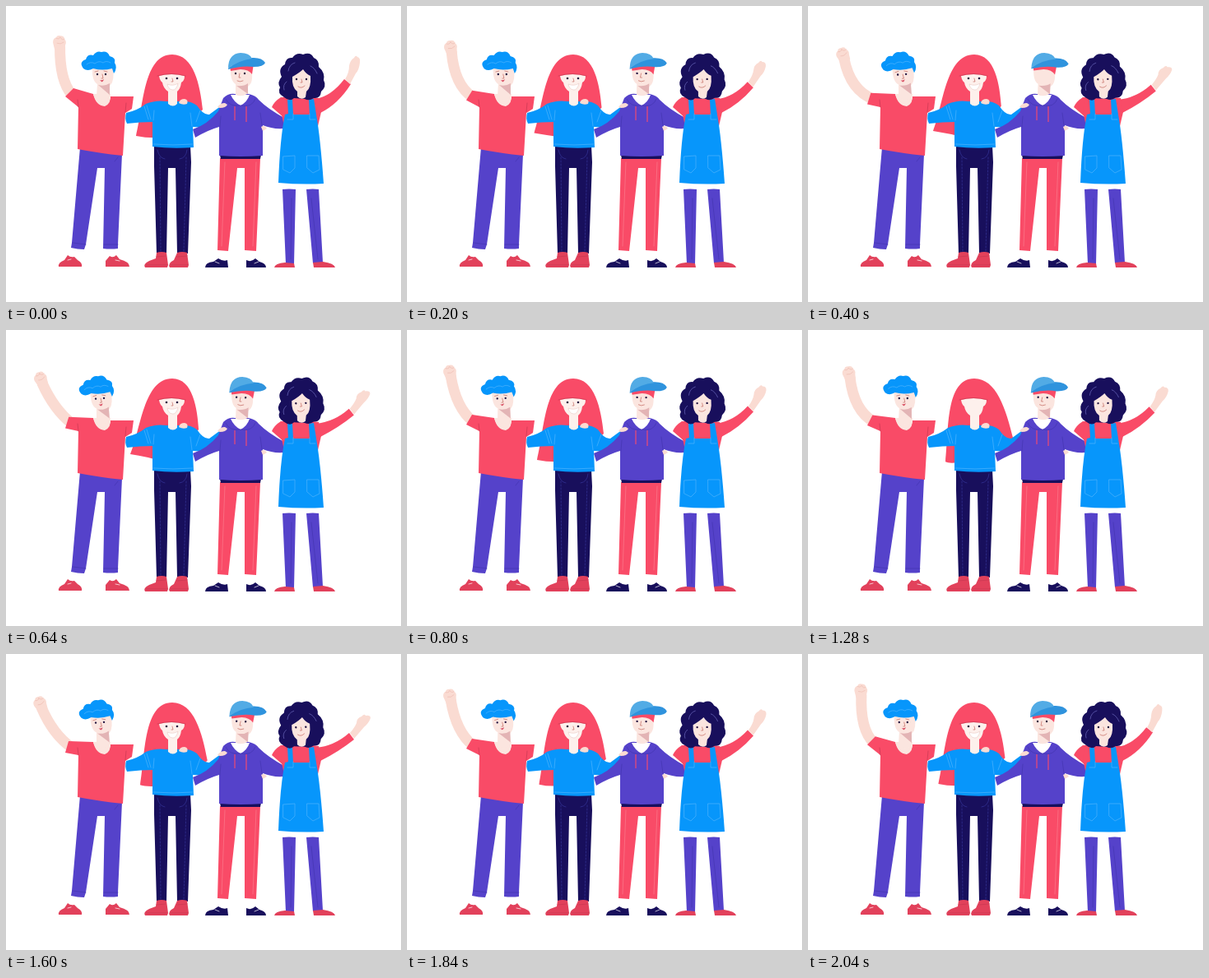
An HTML page that plays this animation: 480 px wide and 360 px high, repeating every 2080 ms.

```html
<!DOCTYPE html>
<html lang="en">
<head>
<meta charset="utf-8">
<title>Four friends waving</title>
<style>
html, body { margin: 0; width: 100%; height: 100%; overflow: hidden; background: #fff; }
svg { display: block; width: 480px; height: 360px; }
.red { fill: #f94b67; }
.shoe { fill: #e2415b; }
.blue { fill: #0796fb; }
.purple { fill: #5542ca; }
.navy { fill: #180f5c; }
.skin { fill: #fbe5df; }
.arm { fill: #fadbd2; }
.pale { fill: #fdf0ec; }
.shade { fill: #e3b4b5; }
.line { fill: none; stroke-width: .7; stroke-linecap: round; stroke-linejoin: round; }
.light { stroke: #4fb3fd; }
.dark { stroke: #4436b0; }
.rose { stroke: #c93852; }
.white { stroke: #fff; }
.stitch { stroke: #35369a; stroke-dasharray: 2 2; }
.face { stroke: #c2685f; }
.eye { fill: #20123f; }
</style>
</head>
<body>
<svg viewBox="0 0 480 360">
  <!-- man in red shirt -->
  <g>
    <path id="armL" fill="none" stroke="#fadbd2" stroke-width="13"/>
    <g id="fistL">
      <path class="arm" d="M-6 10 L-8 1 Q-8 -4 -4 -5 Q-3 -8 1 -7 Q6 -7 6 -3 Q9 0 7 4 L6 10Z"/>
      <path class="line" stroke="#eebfb5" d="M-4 -4 Q-1 -2 1 -5 M1 -5 Q3 -1 6 -3 M-3 2 Q1 4 5 1"/>
    </g>
    <path class="purple" d="M90 172 L141 180 L136 290 L136 295 Q127 296 118 295 L120 197 L111 197 L97 290 L95 296 Q87 296 79 294 L80 288Z"/>
    <path class="line dark" d="M81 288 L97 290 M119 290 L136 290 M136 184 L132 189"/>
    <path id="shirt" class="red"/>
    <path class="line rose" d="M88 123 L87 114 M145 129 L146 118"/>
    <path class="skin" d="M106 107 L127 107 Q128 119 120 122 Q109 121 106 107Z"/>
    <path class="shoe" d="M64 317 Q63 312 71 309 L75 303 Q78 306 83 305 L87 309 Q93 312 92 317Z"/>
    <path class="shoe" d="M121 317 L121 310 L126 304 Q130 307 134 303 L138 308 Q150 311 150 317Z"/>
    <path class="line white" d="M75 309 L79 308 M133 309 L138 310"/>
    <g id="headL">
      <path class="skin" d="M105 74 L130 74 Q132 91 127 96 L126 97 L126 111 Q118 118 110 110 L111 95 Q104 91 105 74Z"/>
      <path class="shade" d="M112 96 Q120 98 126 94 L126 108Z"/>
      <path class="blue" d="M94 76 Q88 68 97 65 Q99 58 106 60 Q110 54 116 56 Q123 54 126 61 Q134 63 132 69 Q136 75 131 82 L129 76 Q117 79 106 76 Q99 80 94 76Z"/>
      <path class="line light" d="M98 71 Q103 67 108 70 Q113 66 118 69 Q122 66 127 69"/>
      <circle class="eye" cx="111" cy="83" r="1.2"/><circle class="eye" cx="121" cy="83" r="1.2"/>
      <path class="line face" d="M108 80 L112 79 M119 79 L123 80 M117 83 L118 88 L116 88"/>
      <path d="M114 90 Q117 91 119 89 Q118 93 116 92Z" fill="#d84d61"/>
    </g>
  </g>

  <!-- red-haired woman -->
  <path id="mane" class="red"/>
  <g>
    <path class="navy" d="M180 170 L224 170 L225 190 L221 301 L208 301 L206 197 L197 197 L195 301 L183 301 L180 195Z"/>
    <path class="line stitch" d="M187 184 L188 298 M219 184 L216 298"/>
    <path class="line" stroke="#35369a" d="M184 175 Q186 185 193 186 M211 186 Q219 185 220 175"/>
    <path class="shoe" d="M183 300 Q189 298 195 300 L197 315 L196 318 L169 318 Q166 314 174 310 L182 307Z"/>
    <path class="shoe" d="M208 300 Q214 298 220 300 L222 315 L221 318 L199 318 Q196 313 204 309Z"/>
    <path class="line rose" d="M183 305 L194 304 M208 305 L220 304 M170 315 L196 315 M200 315 L221 315"/>
    <path class="blue" d="M146 130 Q160 127 170 119 Q182 114 195 116 L211 116 Q224 115 232 121 Q240 133 247 132 L262 121 L266 125 Q253 141 243 148 L227 147 L228 172 Q202 174 178 171 L178 141 Q164 141 147 143 Q144 137 146 130Z"/>
    <path class="line light" d="M168 122 L173 138 M171 121 L176 138 M179 139 L180 127 M226 146 L224 130 M231 141 L236 127 M179 168 Q203 170 227 168"/>
    <path class="pale" d="M186 85 Q201 81 217 85 Q217 91 213 93 Q212 101 208 104 L208 119 Q203 124 197 119 L197 104 Q191 100 190 93 Q187 91 186 85Z"/>
    <path class="line rose" d="M184 85 Q201 80 218 85"/>
    <path class="arm" d="M210 118 Q211 113 217 113 Q222 114 220 119 Q215 121 210 118Z"/>
    <g id="faceR">
      <circle class="eye" cx="195" cy="88" r="1.3"/><circle class="eye" cx="208" cy="88" r="1.3"/>
      <path class="line face" d="M202 88 L203 92 L201 92"/>
      <path d="M196 95 Q203 98 209 94 Q207 103 202 102 Q197 101 196 95Z" fill="#fff" stroke="#e9c9c4" stroke-width=".6"/>
    </g>
  </g>

  <!-- girl in dungarees, near sleeve -->
  <path class="red" d="M334 111 Q326 116 323 123 L339 137 L344 112Z"/>

  <!-- man in hoodie -->
  <g>
    <path class="red" d="M260 185 L309 185 L304 298 L290 297 L290 197 L281 197 L270 298 L257 297Z"/>
    <path class="line" stroke="#fb7a8c" d="M266 190 L262 292 M304 190 L300 292"/>
    <path class="navy" d="M242 318 Q242 312 252 311 L258 307 Q264 311 269 309 L270 318Z M292 318 L292 309 Q298 312 303 307 L308 311 Q316 313 316 318Z"/>
    <path class="line white" d="M254 311 L259 313 M302 313 L307 311"/>
    <path class="navy" d="M260 181 L310 181 L309 186 L261 186Z"/>
    <path class="purple" d="M264 112 Q270 106 278 107 L295 107 Q304 109 307 114 Q318 125 338 136 L337 149 Q324 150 312 145 L312 182 Q285 184 259 182 L259 147 Q245 151 230 160 L227 150 Q245 144 258 128Z"/>
    <path d="M273 108 L296 108 Q293 117 285 121 Q277 117 273 108Z" fill="#fff"/>
    <path class="line dark" d="M267 113 Q271 123 285 121 Q299 124 303 113 M260 147 L261 134 M311 145 L309 130"/>
    <path d="M278 122 L278 139 M292 122 L292 141" stroke="#ee4a72" stroke-width="1.2"/>
    <path class="arm" d="M257 123 Q260 118 266 118 L269 120 Q267 124 260 124Z M310 147 Q314 144 317 149 L312 152Z"/>
    <g id="headC">
      <path class="skin" d="M273 74 L298 74 Q301 91 296 96 L294 98 L293 107 Q286 111 279 108 L279 95 Q272 91 273 74Z"/>
      <path class="shade" d="M280 97 Q289 98 294 94 L294 107Z"/>
      <path class="red" d="M272 74 L301 70 L299 83 Q295 77 285 77 L273 79Z"/>
      <path fill="#2f93dd" d="M270 76 Q282 65 298 63 Q311 62 315 69 Q313 74 301 74 Q287 72 270 77Z"/>
      <path fill="#52abe5" d="M270 76 Q270 58 285 57 Q296 57 299 64 Q283 66 270 76Z"/>
      <g id="faceC">
        <circle class="eye" cx="279" cy="82" r="1.2"/><circle class="eye" cx="290" cy="82" r="1.2"/>
        <path class="line face" d="M284 82 L283 87 L285 87 M281 91 Q284 93 288 91"/>
      </g>
    </g>
  </g>

  <!-- girl in dungarees -->
  <g>
    <path class="purple" d="M336 223 Q344 222 352 223 L350 314 L340 314Z M365 223 Q373 222 380 223 L385 312 L373 313Z"/>
    <path class="line dark" d="M347 234 L346 308 M371 234 L379 308"/>
    <path class="shoe" d="M326 318 Q327 313 339 312 L350 313 L351 318Z M374 318 L373 312 L385 311 Q399 313 400 318Z"/>
    <path id="sleeve" class="red"/>
    <path id="handG" class="arm"/>
    <path class="red" d="M336 111 Q357 108 380 112 L383 129 L379 146 L338 146 L334 128Z"/>
    <path class="blue" d="M342 114 L348 114 L349 132 L369 132 L368 114 L374 113 L377 132 Q382 160 386 216 Q358 217.5 331 215 Q333 160 339 132 L343 131Z"/>
    <path class="line light" d="M337 183 L351 182 L351 197 L345 203 L337 199Z M366 182 L380 182 L381 199 L373 203 L366 197Z"/>
    <path class="line light" d="M342 138 L349 138 L349 131 M369 131 L369 138 L376 138"/>
    <g id="headG">
      <path class="navy" d="M338 111 Q329 106 333 99 Q329 93 335 86 Q330 76 339 71 Q340 62 348 63 Q353 56 361 59 Q370 55 374 63 Q381 66 380 74 Q388 81 386 90 Q390 98 383 104 Q382 113 374 112 Q368 116 363 113 L350 112 Q345 117 338 111Z"/>
      <path class="skin" d="M348 86 Q357 81 361 77 Q365 83 370 85 Q371 100 365 104 L364 111 Q359 115 354 110 L354 104 Q347 99 348 86Z"/>
      <path class="line" stroke="#6c69bd" d="M343 79 Q344 71 351 69 M338 102 Q336 96 341 92 M378 82 Q375 75 370 73"/>
      <circle class="eye" cx="353" cy="89" r="1.2"/><circle class="eye" cx="365" cy="89" r="1.2"/>
      <path class="line face" d="M359 89 L360 93 L358 93 M355 98 Q359 101 363 97"/>
    </g>
  </g>
</svg>
<script>
const LOOP = 2080, WAVE = 1040, STEP = 40;

// [time, value] pairs
const wave = [[0, 0], [80, .08], [160, .32], [240, .6], [320, .83], [400, .95], [520, 1],
  [620, .99], [720, .83], [800, .5], [880, .2], [960, .05], [1040, 0]];
const bend = [[0, 0], [240, .7], [400, 1], [560, .15], [640, 0], [960, .5], [1040, 0]];
const nod = [[0, 0], [240, .1], [320, .55], [400, .95], [520, 1], [660, 1], [800, .65],
  [960, .2], [1040, 0]];
const swing = [[0, 0], [200, -3.5], [400, -6], [520, -7.3], [640, -7], [760, -2], [880, 4],
  [1000, 8], [1140, 9.6], [1280, 9], [1600, 5], [2080, 0]];

const $ = id => document.getElementById(id);
const mix = (a, b, k) => a + (b - a) * k;
const set = (id, name, value) => $(id).setAttribute(name, value);
const tilt = (id, angle, x, y) => set(id, "transform", `rotate(${angle} ${x} ${y})`);
const show = (id, on) => set(id, "visibility", on ? "visible" : "hidden");

function at(keys, t) {
  const i = Math.max(1, keys.findIndex(key => key[0] >= t));
  const [t0, a] = keys[i - 1], [t1, b] = keys[i];
  return mix(a, b, (t - t0) / (t1 - t0));
}

// Blends the numbers of two paths with the same commands
function morph(a, b, k) {
  const ends = b.match(/-?[\d.]+/g);
  let i = 0;
  return a.replace(/-?[\d.]+/g, n => mix(+n, +ends[i++], k).toFixed(2));
}

function drawLeftArm(k, elbow) {
  const angle = mix(13.6, 40.3, k) * Math.PI / 180;
  const reach = mix(63.5, 60.5, k);
  const x = 80 - reach * Math.sin(angle), y = 105 - reach * Math.cos(angle);
  const cx = mix(65, 58, k) - 7 * elbow, cy = mix(90, 97, k) + 6 * elbow;
  set("armL", "d", `M80 ${mix(108, 114, k)} Q${cx} ${cy} ${x + mix(.5, 2, k)} ${y + 6}`);
  set("fistL", "transform", `translate(${x} ${y}) rotate(${mix(-1, -24, k)})`);
  set("shirt", "d", morph(
    "M82 100 L106 107 Q110 121 120 121 Q126 119 127 110 L155 110 L153 125 L145 130 L142 182 Q113 179 87 174 L88 123 L72 110 Z",
    "M76 106 L106 107 Q110 121 120 121 Q126 119 127 110 L155 110 L153 125 L145 130 L142 182 Q113 179 87 174 L88 123 L72 120 Z", k));
}

function drawRightArm(k) {
  set("sleeve", "d", morph(
    "M376 113 Q395 110 411 89 L419 95 Q404 119 382 130 Z",
    "M376 114 Q399 112 417 96 L423 104 Q404 119 382 130 Z", k));
  set("handG", "d", morph(
    "M412 89 Q417 81 417 73 Q418 66 423 63 Q425 59 427 62 Q431 63 430 69 Q429 78 425 82 L418 95 Z",
    "M418 96 Q424 89 426 84 Q426 78 432 76 Q436 72 437 75 Q443 74 443 78 Q441 84 435 89 L423 103 Z", k));
}

function drawMane(h) {
  const x = 158 + h, y = 158 + (h < 0 ? h : h * .25);
  const rx = 239 + h * (h < 0 ? .7 : 1.15), ry = 126 + h * .7;
  set("mane", "d", `M${x} ${y} C${167 + h * .45} 122 167 59 202 59
    C${228 + h * .1} 59 ${236 + h * .5} 96 ${rx} ${ry}
    Q${rx - 6} ${ry + 7} 225 130 L190 160 Q172 ${y + 3} ${x} ${y}Z`);
}

function draw(now) {
  const t = Math.floor(now % LOOP / STEP) * STEP, phase = t % WAVE;
  const k = at(wave, phase);
  drawLeftArm(k, at(bend, phase));
  drawRightArm(k);
  drawMane(at(swing, t));
  tilt("headL", -4.2 * at(nod, phase), 118, 110);
  tilt("headC", 2.6 * k, 286, 108);
  tilt("headG", -1.8 * k, 359, 112);
  show("faceR", t < 1240 || t > 1320);
  show("faceC", t < 360 || t > 440);
}

const start = performance.now();
function tick() {
  draw(performance.now() - start);
  requestAnimationFrame(tick);
}
tick();
</script>
</body>
</html>
```
